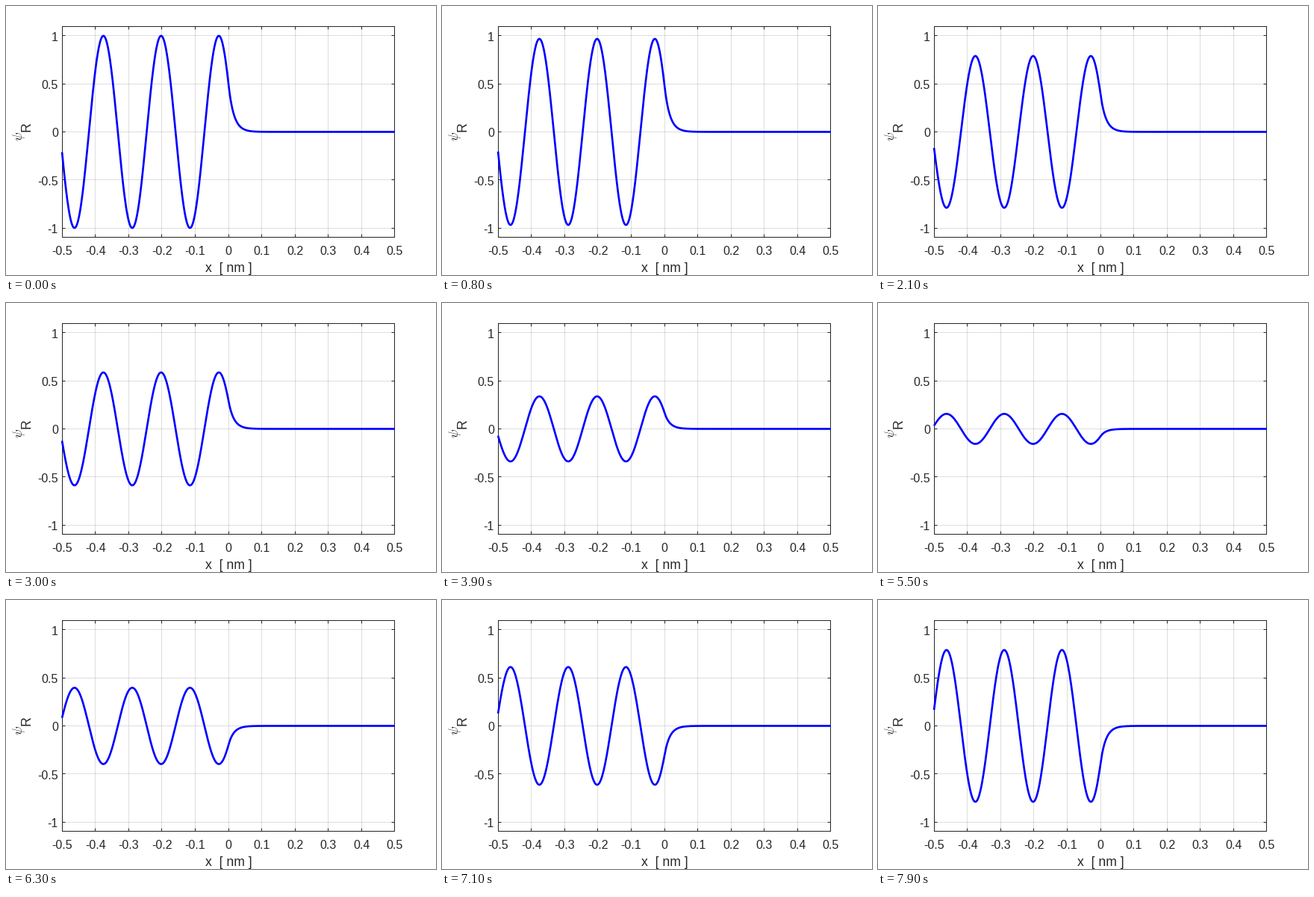
Animation of 576x360 px, one loop 8 s. Source, as a matplotlib script:

```python
import numpy as np
import matplotlib.pyplot as plt
from matplotlib.animation import FuncAnimation
from matplotlib.transforms import Affine2D

W, H, DPI = 576, 360, 96
PX = 72 / DPI                      # points per pixel
LEFT, RIGHT, TOP, BOTTOM = 74.55, 520.47, 26.55, 309.4
HALF = 0.5                         # box and grid snap to pixel centres, the curve does not
FRAMES, STEP_MS, PERIOD_MS = 80, 100, 20000
INK = "#262626"

plt.rcParams.update({"font.family": "Liberation Sans", "mathtext.fontset": "cm"})

fig = plt.figure(figsize=(W / DPI, H / DPI), dpi=DPI, facecolor="white")
ax = fig.add_axes([LEFT / W, 1 - BOTTOM / H, (RIGHT - LEFT) / W, (BOTTOM - TOP) / H])
ax.set(xlim=(-0.5, 0.5), ylim=(-1.1, 1.1))

xticks = np.arange(-5, 6) / 10
yticks = np.arange(-2, 3) / 2
ax.set_xticks(xticks)
ax.set_yticks(yticks)
ax.set_axisbelow(True)
ax.grid(color=INK, alpha=0.15, linewidth=PX)
ax.tick_params(direction="in", length=4.45 * PX, width=PX, color=INK,
               top=True, right=True, labelbottom=False, labelleft=False)
for spine in ax.spines.values():
    spine.set(color=INK, linewidth=PX)


def label(x, y, text, size=12, ha="center", rotation=0):
    """Place text with its baseline at a pixel position measured from the top left."""
    fig.text(x / W, 1 - y / H, text, size=size, color=INK, ha=ha,
             va="baseline", rotation=rotation, rotation_mode="anchor")


for v in xticks:
    label(LEFT + HALF + (v + 0.5) * (RIGHT - LEFT), 333, f"{v:g}")
for v in yticks:
    label(70, TOP + HALF + (1.1 - v) / 2.2 * (BOTTOM - TOP) + 7, f"{v:g}", ha="right")
label(298, 356, "x  [ nm ]", 13.2)
label(22, 181, r"$\psi$", 13.2, "left", 90)
label(33, 167.5, "R", 13.2, "left", 90)

# Electron at a potential step: standing wave on the left, decay on the right.
ENERGY, BARRIER = 50, 200          # eV
K_UNIT = 5.1232                    # sqrt(2 m * 1 eV) / hbar in 1/nm
k = K_UNIT * np.sqrt(ENERGY)
kappa = K_UNIT * np.sqrt(BARRIER - ENERGY)
phase = np.arctan2(kappa, k)

x = np.linspace(-0.5, 0.5, 1001)
psi = np.where(x < 0, np.cos(k * x + phase),
               np.cos(phase) * np.exp(-kappa * np.maximum(x, 0)))
wave, = ax.plot(x, psi, color="#0000ff", linewidth=2, clip_on=False, zorder=3,
                solid_capstyle="butt",
                transform=ax.transData + Affine2D().translate(HALF, -HALF))


def update(i):
    wave.set_ydata(psi * np.cos(2 * np.pi * i * STEP_MS / PERIOD_MS))
    return wave,


anim = FuncAnimation(fig, update, frames=FRAMES, interval=STEP_MS,
                     repeat=True, repeat_delay=0)
plt.show()
```
